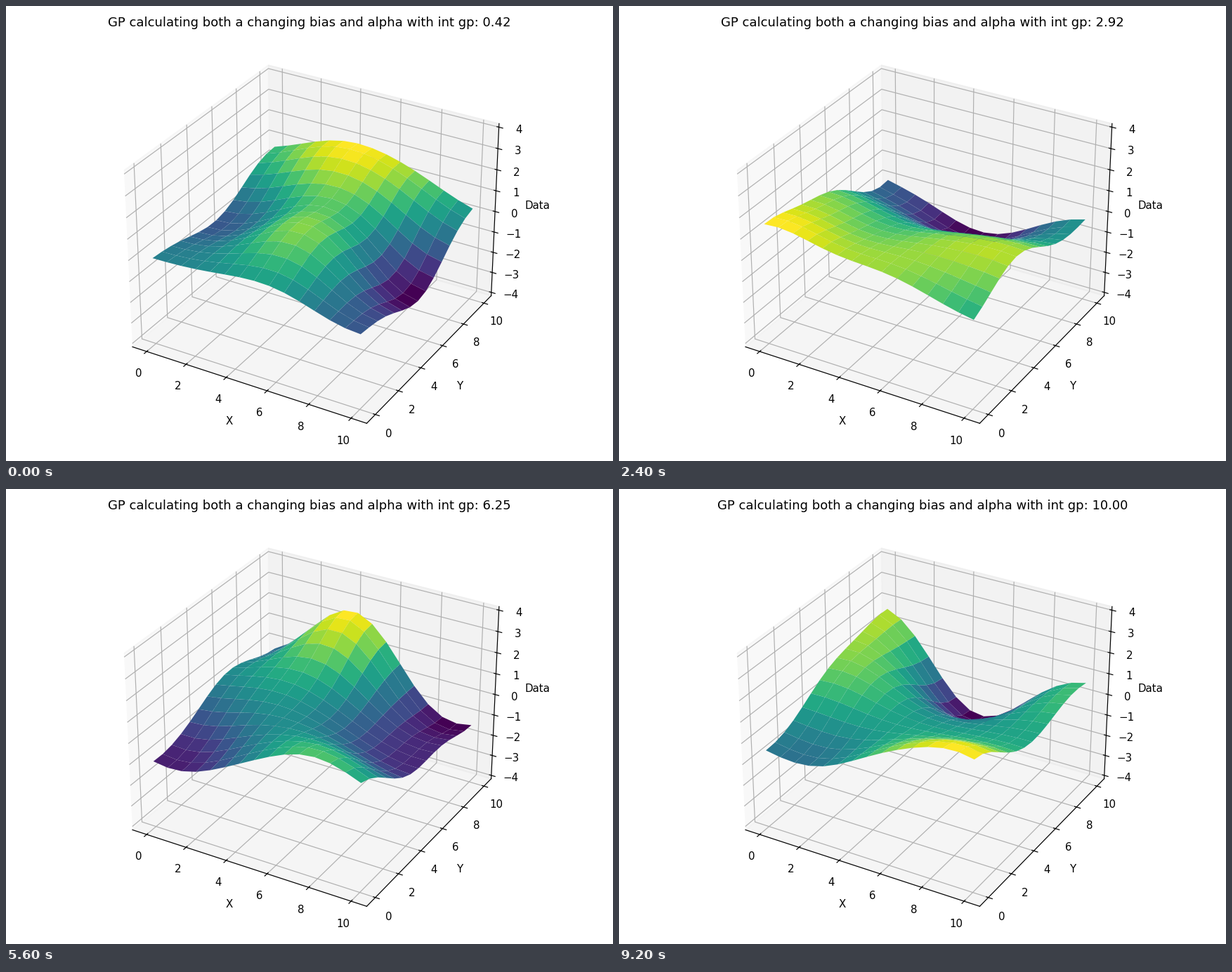
Write a matplotlib script that moves like this. It is 864 by 648 pixels and loops after 9.6 s.

```python
import matplotlib.pyplot as plt
import numpy as np
from matplotlib.animation import FuncAnimation

W, H, DPI = 864, 648, 108
FRAMES, INTERVAL = 24, 400
TITLE = "GP calculating both a changing bias and alpha with int gp: {:.2f}"
SPACE_LENGTH, TIME_LENGTH = 2.2, 1.1

# Main hills and hollows (x, y, height) at a few steps of time.
POSES = {
    1: [(3.5, 9.5, 1.9), (7, 9.5, 1.4), (6, 3.5, 1.25), (9.5, 5, -1.6),
        (0.5, 5.2, -0.6), (9.6, 0, -0.6), (0, 9, 0.6)],
    5: [(0, 0, 2), (6.2, 3.7, 1.1), (10, 0, -1.7), (0, 9.6, -2.3),
        (2.6, 9.8, -0.4), (6, 9.8, -1.3), (9.8, 6, -1)],
    10: [(0, 0, -0.5), (0.8, 4.4, 1.9), (5.5, 0, 1.8), (10, 0.5, 2.6),
         (10, 4.2, 2.8), (0, 10, 1.1), (3, 9.5, -2.3)],
    13: [(1.2, 0, -1.9), (2, 4, 1.9), (6, 2, 1.2), (10, 0, 0.8),
         (4.6, 10, 2), (8.5, 10, -0.9), (0, 9, -0.5)],
    17: [(8, 0.3, 2.6), (1.2, 3.6, -1.3), (0, 6.6, 0.5), (2.6, 0, 0.9),
         (4.2, 9.8, 1.6), (10, 5, -0.7), (9, 10, -1)],
    20: [(8, 1.6, 2.7), (3, 0, 1.7), (6.6, 4.6, 2), (1, 4.8, -1),
         (1, 9, 0.6), (10, 6.8, -0.5), (8, 10, 0.7)],
    24: [(0, 10, 1.7), (1, 5.5, 1.2), (2, 0.6, -0.6), (9.6, 0, 2.1),
         (4.6, 9.8, -2.3), (10, 9, 0.8), (6, 0, 1.2)],
}


def kernel(a, b, length):
    gap = a[:, None, :] - b[None, :, :]
    return np.exp(-(gap ** 2).sum(axis=2) / (2 * length ** 2))


def gp_mean(new, known, values, length):
    """Gaussian process mean at new points, given values at known ones."""
    gram = kernel(known, known, length) + 1e-4 * np.eye(len(known))
    return kernel(new, known, length) @ np.linalg.solve(gram, values)


axis = np.linspace(0, 10, 15)
X, Y = np.meshgrid(axis, axis)
grid = np.column_stack([X.ravel(), Y.ravel()])
times = np.linspace(0, 10, FRAMES + 1)


def pose_surface(points):
    points = np.array(points)
    return gp_mean(grid, points[:, :2], points[:, 2], SPACE_LENGTH)


poses = np.array([pose_surface(points) for points in POSES.values()])
pose_times = times[list(POSES)]
surfaces = gp_mean(times[:, None], pose_times[:, None], poses, TIME_LENGTH)
surfaces = surfaces.reshape(-1, *X.shape)

fig = plt.figure(figsize=(W / DPI, H / DPI), dpi=DPI)
ax = fig.add_subplot(projection="3d")
side, bottom = 593.6, 16.2
ax.set_position([(W - side) / 2 / W, bottom / H, side / W, side / H])


def padded(low, high):
    pad = (high - low) / 48
    return low - pad, high + pad


ax.set_xlim(*padded(-0.5, 10.5))
ax.set_ylim(*padded(-0.5, 10.5))
ax.set_zlim(*padded(-4, 4))
ax.set_xticks(range(0, 11, 2))
ax.set_yticks(range(0, 11, 2))
ax.set_zticks(range(-4, 5))
ax.set_xlabel("X")
ax.set_ylabel("Y")
ax.set_zlabel("Data")
title = ax.set_title("")
drawn = []


def update(i):
    while drawn:
        drawn.pop().remove()
    drawn.append(ax.plot_surface(X, Y, surfaces[i + 1], cmap="viridis"))
    title.set_text(TITLE.format(times[i + 1]))
    return drawn


anim = FuncAnimation(fig, update, frames=FRAMES, init_func=lambda: update(0),
                     interval=INTERVAL, repeat=True, repeat_delay=0)
plt.show()
```
